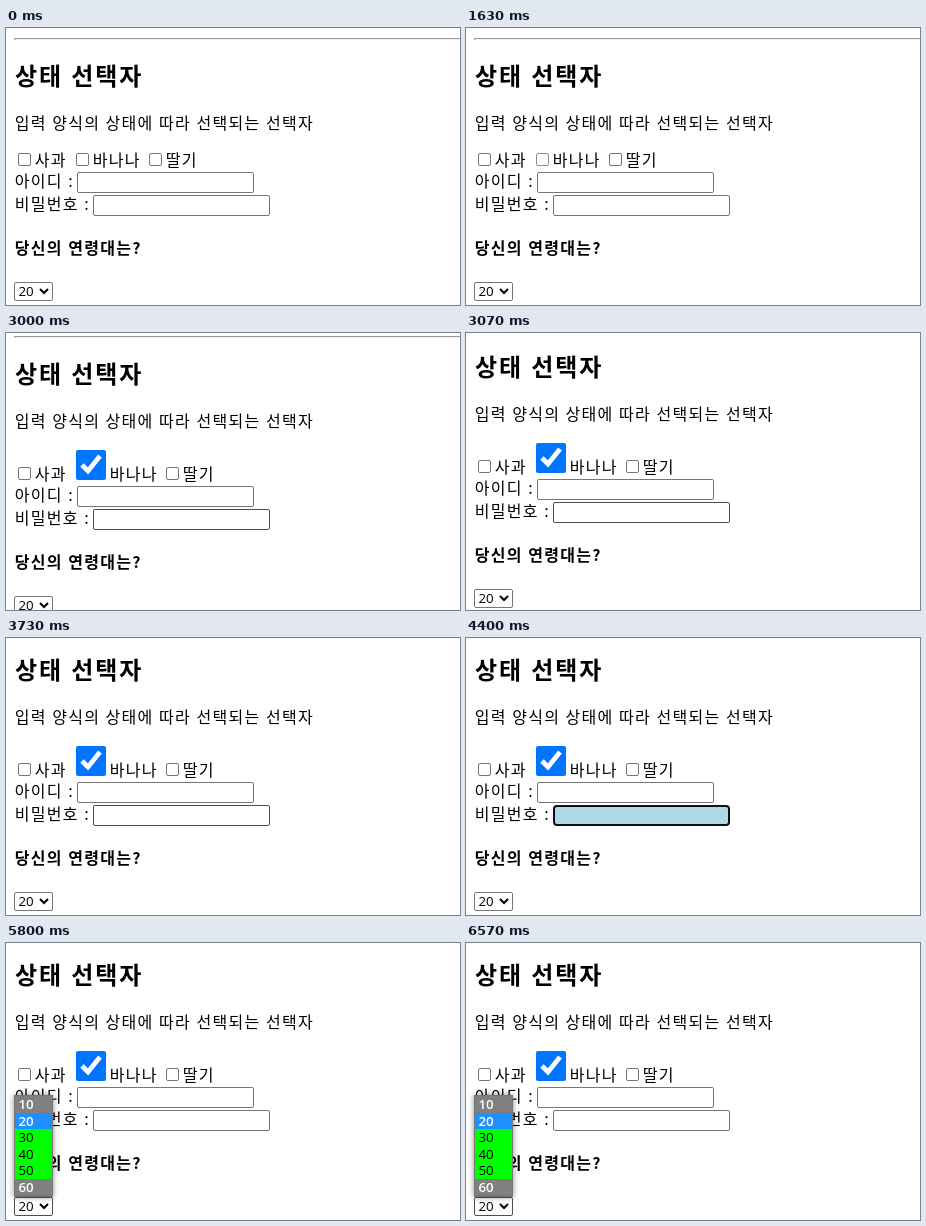
An HTML page with a canvas for the animation above (8000 ms loop, 454 px wide and 277 px high).

```html
<!DOCTYPE html>
<html lang="ko">
<head>
<meta charset="utf-8">
<title>상태 선택자</title>
<style>
  html, body { margin: 0; width: 100%; height: 100%; overflow: hidden; background: #fff; }
  canvas { display: block; width: 454px; height: 277px; }
</style>
</head>
<body>
<canvas id="stage"></canvas>
<script>
const W = 454, H = 277, LOOP = 8000;
const HANGUL = '"Noto Sans CJK KR", "Noto Sans CJK", sans-serif';
const LATIN = '"Open Sans", "Noto Sans", sans-serif';
const BORDER = '#767676', HOVER = '#4f4f4f', PRESSED = '#8d8d8d', RING = '#101010';

const canvas = document.getElementById('stage');
const ctx = canvas.getContext('2d');
const ratio = window.devicePixelRatio || 1;
canvas.width = Math.round(W * ratio);
canvas.height = Math.round(H * ratio);

// Value of the last [time, value] step reached.
function at(steps, t) {
  let value = steps[0][1];
  for (const [time, next] of steps) if (t >= time) value = next;
  return value;
}
const within = (t, a, b) => t >= a && t < b;

const SCROLL = [[0, 0], [2970, 3], [3000, 7], [3030, 11], [3070, 14], [3100, 15], [3130, 16]];
const ACTIVE = [[0, 1], [6270, 4], [6430, 3], [6500, 2], [6570, 1]];
const POPUP = [[0, 0], [5770, 0.5], [5800, 1]];

function stateAt(t) {
  const focus = within(t, 3870, 5700);
  return {
    big: t >= 1730,
    scroll: at(SCROLL, t),
    box: at([[0, BORDER], [1470, HOVER], [1630, PRESSED]], t),
    fill: t < 2000 ? '#005cc8' : '#0075ff',
    idHover: within(t, 830, 970) || within(t, 2030, 2070),
    pwHover: within(t, 730, 830) || within(t, 2370, 3170) || within(t, 3730, 3870),
    focus,
    caret: focus && Math.floor((t - 3870) / 530) % 2 === 0,
    selectHover: t >= 4970,
    popup: at(POPUP, t),
    active: at(ACTIVE, t)
  };
}

function text(str, x, y, size = 16, weight = 350) {
  ctx.font = `${weight} ${size}px ${HANGUL}`;
  ctx.letterSpacing = size * 0.08 + 'px';
  ctx.wordSpacing = size * 0.036 + 'px';
  ctx.fillStyle = '#000';
  // Half of the tracking goes before the first glyph.
  ctx.fillText(str, x + size * 0.045, y);
}

function digits(str, x, y, color, weight = 400) {
  ctx.font = `${weight} 13.333px ${LATIN}`;
  ctx.letterSpacing = ctx.wordSpacing = '0px';
  ctx.fillStyle = color;
  ctx.fillText(str, x, y);
}

function rect(x, y, w, h, color) {
  ctx.fillStyle = color;
  ctx.fillRect(x, y, w, h);
}

function frame(x, y, w, h, color, line = 1, radius = 1.5, fill = '#fff') {
  ctx.beginPath();
  ctx.roundRect(x + line / 2, y + line / 2, w - line, h - line, radius);
  ctx.fillStyle = fill;
  ctx.fill();
  ctx.strokeStyle = color;
  ctx.lineWidth = line;
  ctx.stroke();
}

function polyline(points, color, line) {
  ctx.beginPath();
  points.forEach(([x, y]) => ctx.lineTo(x, y));
  ctx.strokeStyle = color;
  ctx.lineWidth = line;
  ctx.stroke();
}

const checkbox = (x, y, color = BORDER) => frame(x, y, 13, 13, color);

function checked(x, y, size, color) {
  ctx.beginPath();
  ctx.roundRect(x, y, size, size, 2);
  ctx.fillStyle = color;
  ctx.fill();
  const u = size / 5;
  polyline([[x + u, y + 2.5 * u], [x + 2 * u, y + 3.5 * u], [x + 4 * u, y + u]], '#fff', size * 0.16);
}

function drawRule(y) {
  rect(8, y, W - 8, 1, '#9a9a9a');
  rect(8, y + 1, W - 8, 1, '#eee');
  rect(8, y + 1, 1, 1, '#9a9a9a');
}

function drawFruits(s, y) {
  const size = s.big ? 30 : 13;
  const third = s.big ? 160 : 143;
  checkbox(12, y - 13);
  text('사과', 28, y);
  if (s.big) checked(70, y - size, size, s.fill);
  else checkbox(70, y - 13, s.box);
  text('바나나', 73 + size, y);
  checkbox(third, y - 13);
  text('딸기', third + 16, y);
}

function drawFields(s, y) {
  text('아이디 :', 8, y + 15);
  frame(71, y, 177, 21, s.idHover ? HOVER : BORDER);
  text('비밀번호 :', 8, y + 38);
  if (s.focus) frame(87, y + 23, 177, 21, RING, 2, 3, 'lightblue');
  else frame(87, y + 23, 177, 21, s.pwHover ? HOVER : BORDER);
  if (s.caret) rect(91, y + 26, 1, 15, '#000');
}

function drawSelect(s, y) {
  frame(8, y, 39, 19, s.selectHover ? HOVER : BORDER);
  digits('20', 12.4, y + 14, '#000');
  polyline([[34, y + 7], [38, y + 11], [42, y + 7]], '#000', 2);
}

function drawPopup(s) {
  ctx.save();
  ctx.globalAlpha = s.popup;
  ctx.shadowColor = 'rgba(0,0,0,0.45)';
  ctx.shadowBlur = 6 * ratio;
  rect(8, 152, 39, 102, BORDER);
  ctx.shadowColor = 'transparent';
  for (let i = 0; i < 6; i++) {
    const top = Math.round(153 + 16.5 * i);
    const bottom = Math.round(153 + 16.5 * (i + 1));
    const disabled = i === 0 || i === 5;
    const active = i === s.active;
    const light = active || disabled;
    rect(9, top, 37, bottom - top, active ? '#1e90ff' : disabled ? '#808080' : '#00ff00');
    digits(String(10 * (i + 1)), 12.4, top + 12.5, light ? '#fff' : '#000', light ? 600 : 400);
  }
  ctx.restore();
}

function draw(t) {
  const s = stateAt(t);
  const up = -s.scroll;
  const low = up + (s.big ? 16 : 0);
  ctx.setTransform(ratio, 0, 0, ratio, 0, 0);
  rect(0, 0, W, H, '#fff');
  drawRule(10 + up);
  text('상태 선택자', 8, 57 + up, 24, 700);
  text('입력 양식의 상태에 따라 선택되는 선택자', 8, 101 + up);
  drawFruits(s, 138 + low);
  drawFields(s, 144 + low);
  text('당신의 연령대는?', 8, 226 + low, 16, 700);
  drawSelect(s, 254 + low);
  if (s.popup) drawPopup(s);
}

const start = performance.now();
function tick() {
  draw((performance.now() - start) % LOOP);
  requestAnimationFrame(tick);
}
tick();
</script>
</body>
</html>
```
